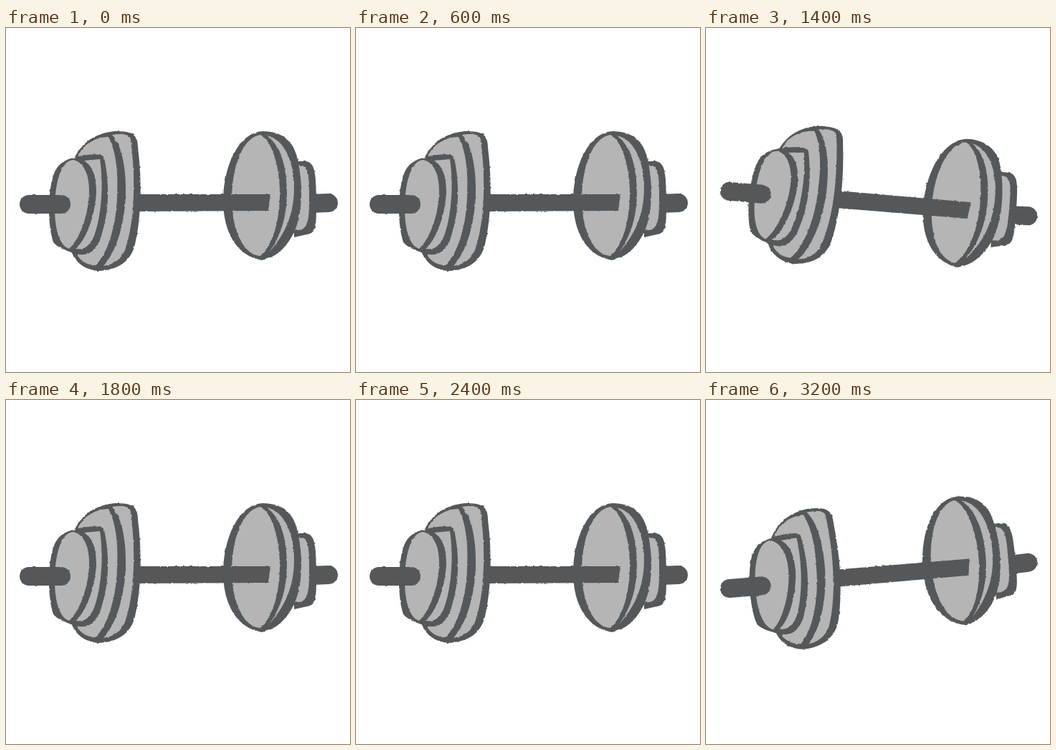
An HTML page that plays this animation: 480 px wide and 480 px high, repeating every 3400 ms.

```html
<!DOCTYPE html>
<html lang="en">
<head>
<meta charset="utf-8">
<title>Dumbbell</title>
<style>
  html, body { margin: 0; width: 100%; height: 100%; overflow: hidden; background: #fff; }
  svg { display: block; width: 100%; height: 100%; }
  .dark { fill: #54585a; }
  .light { fill: #b5b5b5; }
  .grip { stroke: #54585a; stroke-width: 26; stroke-linecap: round; }
</style>
</head>
<body>
<svg viewBox="0 0 480 480">
  <filter id="rough" filterUnits="userSpaceOnUse" x="0" y="0" width="480" height="480" color-interpolation-filters="sRGB">
    <feTurbulence type="fractalNoise" baseFrequency=".2" numOctaves="2" seed="4"/>
    <feDisplacementMap in="SourceGraphic" scale="2.5" xChannelSelector="R" yChannelSelector="G"/>
  </filter>
  <g filter="url(#rough)">
    <g id="dumbbell">
      <path class="grip" d="M425 245L450 244"/>

      <!-- right plates -->
      <path class="dark" d="M400 186L420 186C432 190 432 205 433 235C433 275 434 286 420 288L402 292Z"/>
      <path class="light" d="M405 192C423 188 423 205 423 235C423 270 422 284 402 282Z"/>
      <path class="dark" d="M358 144C385 144 401 158 406 180C416 220 413 262 402 285C392 305 378 320 357 324C322 318 303 285 303 240C304 190 325 146 358 144Z"/>
      <path class="light" d="M364 150C382 154 396 172 401 205C405 245 397 280 367 313C384 290 392 262 392 230C392 195 384 165 364 150Z"/>
      <path class="light" d="M355 149C372 158 382 195 382 232C382 268 372 305 354 318C332 316 316 285 315 240C315 190 332 152 355 149Z"/>

      <path class="dark" d="M182 232L369 232L366 255L182 256Z"/>

      <!-- left plates -->
      <path class="dark" d="M92 190C104 156 130 146 152 144C172 144 184 146 184 166C190 215 189 262 180 302C174 326 156 338 128 339C110 337 98 328 92 314Z"/>
      <path class="light" d="M148 149C162 147 173 148 174 156C181 210 180 270 166 310C160 324 148 331 136 332C154 312 165 275 167 235C168 200 163 165 148 149Z"/>
      <path class="light" d="M100 180C108 160 128 152 143 152C153 170 157 200 155 235C154 275 142 315 125 331C112 331 104 324 100 318Z"/>
      <path class="dark" d="M94 181C110 176 136 174 137 181C146 225 143 262 131 296C122 314 112 320 94 314C82 310 72 306 66 299C57 270 59 225 67 203C72 190 82 184 94 181Z"/>
      <path class="light" d="M109 185L131 183C136 215 134 260 123 290C116 306 108 310 97 308C112 296 124 262 126 230C126 205 120 192 109 185Z"/>
      <path class="light" d="M93 184C108 186 117 205 116 230C115 262 102 296 88 308C76 304 68 285 68 250C69 210 78 186 93 184Z"/>

      <path class="grip" d="M32 246L77 246"/>
    </g>
  </g>
</svg>
<script>
const dumbbell = document.getElementById('dumbbell');
const level = 0, down = 5, up = -4.7;

// Tilt in degrees, held for each 200 ms step.
const hold = (tilt, steps) => Array(steps).fill(tilt);
const tilts = [
  hold(level, 2), hold(down, 1), hold(level, 2), hold(up, 1),
  hold(level, 1), hold(down, 2), hold(level, 1), hold(up, 2),
  hold(level, 1), hold(down, 1), hold(level, 2), hold(up, 1)
].flat();

function tick() {
  const step = Math.floor(performance.now() / 200) % tilts.length;
  dumbbell.setAttribute('transform', `rotate(${tilts[step]} 240 245)`);
  requestAnimationFrame(tick);
}
tick();
</script>
</body>
</html>
```
